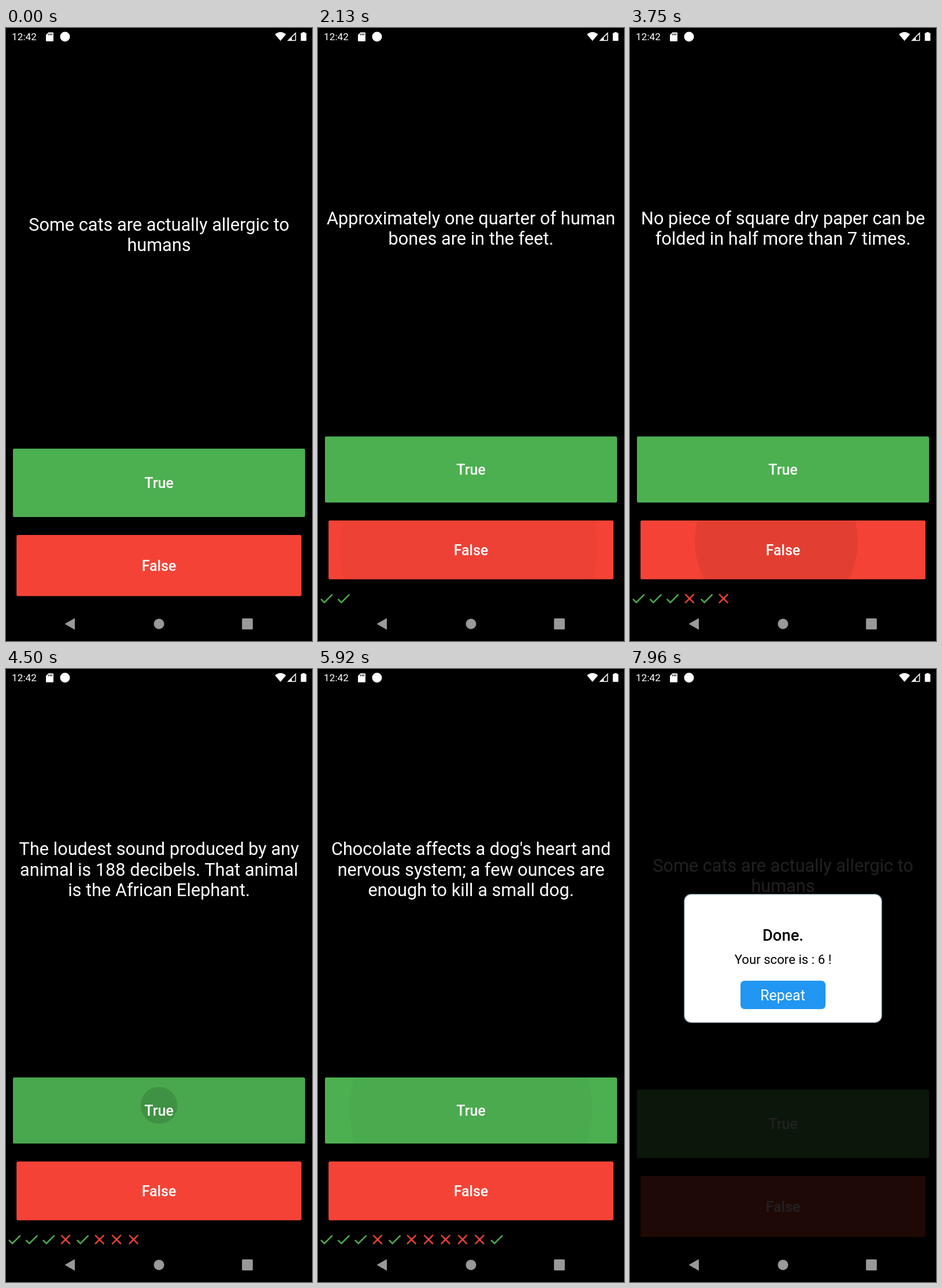
These frames come from a looping animation (529x1058 px, 8 s). An HTML page:

```html
<!DOCTYPE html>
<html lang="en">
<head>
<meta charset="utf-8">
<title>True or false quiz</title>
<style>
  html, body { margin: 0; width: 100%; height: 100%; overflow: hidden; background: #000; }
  svg { display: block; width: 100vw; height: 100vh; font-family: Roboto, sans-serif; }
  text { text-anchor: middle; fill: #fff; }
  #question { font-size: 30.7px; }
  .label { font-size: 25px; font-weight: 500; }
  #dialog text { fill: #000; }
</style>
</head>
<body>
<svg viewBox="0 0 529 1058">
  <rect width="529" height="1058"/>
  <text id="question"></text>
  <g id="buttons"></g>
  <g id="marks"></g>
  <rect id="barrier" width="529" height="1058"/>

  <g id="dialog">
    <rect x="93.7" y="388.7" width="341.6" height="221.6" rx="12" fill="#fff" stroke="#607d8b" stroke-width="1.3"/>
    <text x="264.5" y="468.5" font-size="27.4" font-weight="500">Done.</text>
    <text x="264.5" y="508.5" font-size="22.2">Your score is : 6 !</text>
    <rect x="191" y="538" width="147" height="49" rx="7" fill="#2196f3"/>
    <text x="264" y="571.5" font-size="25" style="fill:#fff">Repeat</text>
  </g>

  <rect y="997" width="529" height="61"/>
  <g fill="#fff">
    <text x="31.5" y="21" font-size="17.2">12:42</text>
    <path d="M73.5 7.5H80.5Q82 7.5 82 9V21.5Q82 23 80.5 23H70.5Q69 23 69 21.5V12Z"/>
    <path d="M74 9.5V12.5M76.7 9.5V12.5M79.4 9.5V12.5" stroke="#000" stroke-width="1.3"/>
    <circle cx="102" cy="15" r="8.5"/>
    <path d="M465 11Q474.500 3 484 11L474.500 22.300Z"/>
    <path d="M486 22.300L501.300 7V22.300Z"/>
    <path d="M494 16.500L499.800 10.700V20.800H494Z" fill="#000"/>
    <path d="M510.500 8.500H512.500V7H516.500V8.500H518.500Q519.300 8.500 519.300 9.300V21.500Q519.300 22.300 518.500 22.300H510.500Q509.700 22.300 509.700 21.500V9.300Q509.700 8.500 510.500 8.500Z"/>
  </g>
  <g fill="#999">
    <path d="M101.500 1028.500L119 1018.500V1038.500Z"/>
    <circle cx="264.500" cy="1028.500" r="9"/>
    <rect x="408" y="1019" width="18.700" height="19" rx="1.500"/>
  </g>
</svg>
<script>
const LOOP = 8000;
const DP = 1.225;
const MID = 264.5;
const INK = 0.14;
const FADE = 200;

const questions = [
  "Some cats are actually allergic to|humans",
  "You can lead a cow down stairs but|not up stairs.",
  "Approximately one quarter of human|bones are in the feet.",
  "A slug's blood is green.",
  "Rudd Tervil's mother's maiden name|was \"Mead\".",
  "It is illegal to pee in the Ocean in|Portugal.",
  "No piece of square dry paper can be|folded in half more than 7 times.",
  "In London, UK, if you happen to die|in the main council hall, you are|technically entitled to a state|funeral, because the building is|considered too sacred a place.",
  "The loudest sound produced by any|animal is 188 decibels. That animal|is the African Elephant.",
  "The total surface area of two human|lungs is approximately 70 square|metres.",
  "Velmora was originally called|\"Tinpot\".",
  "Chocolate affects a dog's heart and|nervous system; a few ounces are|enough to kill a small dog.",
  "In West Virginia, USA, if you|accidentally hit an animal with your|car, you are free to take it home to|eat."
].map(q => q.split("|"));

// at: release time, dx/dy: finger position from the button centre, hold: press length
const tap = (at, answer, right, dx = 0, dy = -10, hold = 70) => ({ at, answer, right, dx, dy, hold });
const T = 0, F = 1;
const taps = [
  tap(1575, T, true), tap(1965, F, true, -20, -25), tap(2350, T, true),
  tap(2730, F, false, -54, -29), tap(3190, T, true), tap(3652, F, false, -23, -29),
  tap(4070, T, false), tap(4490, T, false), tap(4910, T, false),
  tap(5325, F, false, 1.5, -31, 95), tap(5765, T, true), tap(6200, F, false, 0, -28),
  tap(6633, T, true, 11, -6, 35)
];
const DONE = taps[taps.length - 1].at;

const CHECK = "M9 16.170L4.830 12l-1.420 1.410L9 19 21 7l-1.410-1.410z";
const CROSS = "M19 6.410L17.590 5 12 10.590 6.410 5 5 6.410 10.590 12 5 17.590 6.410 19 12 13.410 17.590 19 19 17.590 13.410 12z";

const byId = id => document.getElementById(id);
const clamp = v => Math.min(1, Math.max(0, v));

function make(tag, attrs, parent) {
  const el = document.createElementNS("http://www.w3.org/2000/svg", tag);
  set(el, attrs);
  parent.append(el);
  return el;
}
function set(el, attrs) {
  for (const k in attrs) el.setAttribute(k, attrs[k]);
}

// Each button has [top, height] without and with the row of marks.
function makeButton(label, fill, x, width, plain, raised) {
  const g = make("g", {}, byId("buttons"));
  const clip = make("clipPath", { id: "clip" + label }, g);
  const frame = { x, width, rx: 2.5 };
  const clipRect = make("rect", frame, clip);
  const face = make("rect", { ...frame, fill }, g);
  const shade = make("rect", frame, g);
  const holder = make("g", { "clip-path": `url(#clip${label})` }, g);
  const splash = make("circle", {}, holder);
  const text = make("text", { class: "label", x: MID }, g);
  text.textContent = label;
  return { width, plain, raised, rects: [clipRect, face, shade], shade, splash, text };
}
const buttons = [
  makeButton("True", "#4caf50", 12, 505, [726, 118], [705, 114]),
  makeButton("False", "#f44336", 18.2, 492.6, [875, 105.500], [850, 101.500])
];

const marks = taps.slice(0, -1).map((tp, i) => make("path", {
  d: tp.right ? CHECK : CROSS,
  fill: tp.right ? "#4caf50" : "#f44336",
  transform: `translate(${i * 24 * DP} 970) scale(${DP})`
}, byId("marks")));

let shown = "";
function showQuestion(index, centre) {
  const key = index + ":" + centre;
  if (key === shown) return;
  shown = key;
  const lines = questions[index];
  const node = byId("question");
  node.replaceChildren();
  lines.forEach((line, i) => {
    const y = centre + (i - (lines.length - 1) / 2) * 35.8 + 10.5;
    make("tspan", { x: MID, y }, node).textContent = line;
  });
}

function drawButton(b, index, t, raised) {
  const [top, height] = raised ? b.raised : b.plain;
  const cy = top + height / 2;
  b.rects.forEach(r => set(r, { y: top, height }));
  set(b.text, { y: cy + 9 });

  const tp = taps.find(p => p.answer === index && t >= p.at - p.hold && t < p.at + FADE);
  if (!tp) {
    set(b.shade, { opacity: 0 });
    set(b.splash, { opacity: 0 });
    return;
  }
  const held = Math.min(t - tp.at + tp.hold, tp.hold);
  const after = Math.max(0, t - tp.at);
  const reach = Math.hypot(b.width / 2 + Math.abs(tp.dx), height / 2 + Math.abs(tp.dy));
  const grown = clamp(held / 1000 + after * DP / reach);
  set(b.shade, { opacity: INK * clamp((held - after) / FADE) });
  set(b.splash, {
    cx: MID + tp.dx * (1 - grown),
    cy: cy + tp.dy * (1 - grown),
    r: reach * grown,
    opacity: INK * (1 - after / FADE)
  });
}

// cubic-bezier(.25, .1, .25, 1)
function ease(x) {
  let lo = 0, hi = 1;
  const bez = (s, a, b) => 3 * (1 - s) ** 2 * s * a + 3 * (1 - s) * s * s * b + s ** 3;
  for (let i = 0; i < 20; i++) {
    const s = (lo + hi) / 2;
    if (bez(s, 0.25, 0.25) < x) lo = s; else hi = s;
  }
  return bez(lo, 0.1, 1);
}

function render(t) {
  const answered = t >= DONE ? 0 : taps.filter(p => t >= p.at).length;
  const raised = answered > 0;
  showQuestion(answered, raised ? 346 : 357);
  buttons.forEach((b, i) => drawButton(b, i, t, raised));
  marks.forEach((m, i) => set(m, { visibility: i < answered ? "visible" : "hidden" }));

  const open = clamp((t - DONE) / 200);
  set(byId("barrier"), { opacity: 0.87 * ease(open) });
  set(byId("dialog"), {
    transform: `translate(0 ${1058 * (1 - open)})`,
    visibility: open > 0 ? "visible" : "hidden"
  });
}

const start = performance.now();
function tick() {
  render((performance.now() - start) % LOOP);
  requestAnimationFrame(tick);
}
tick();
</script>
</body>
</html>
```
